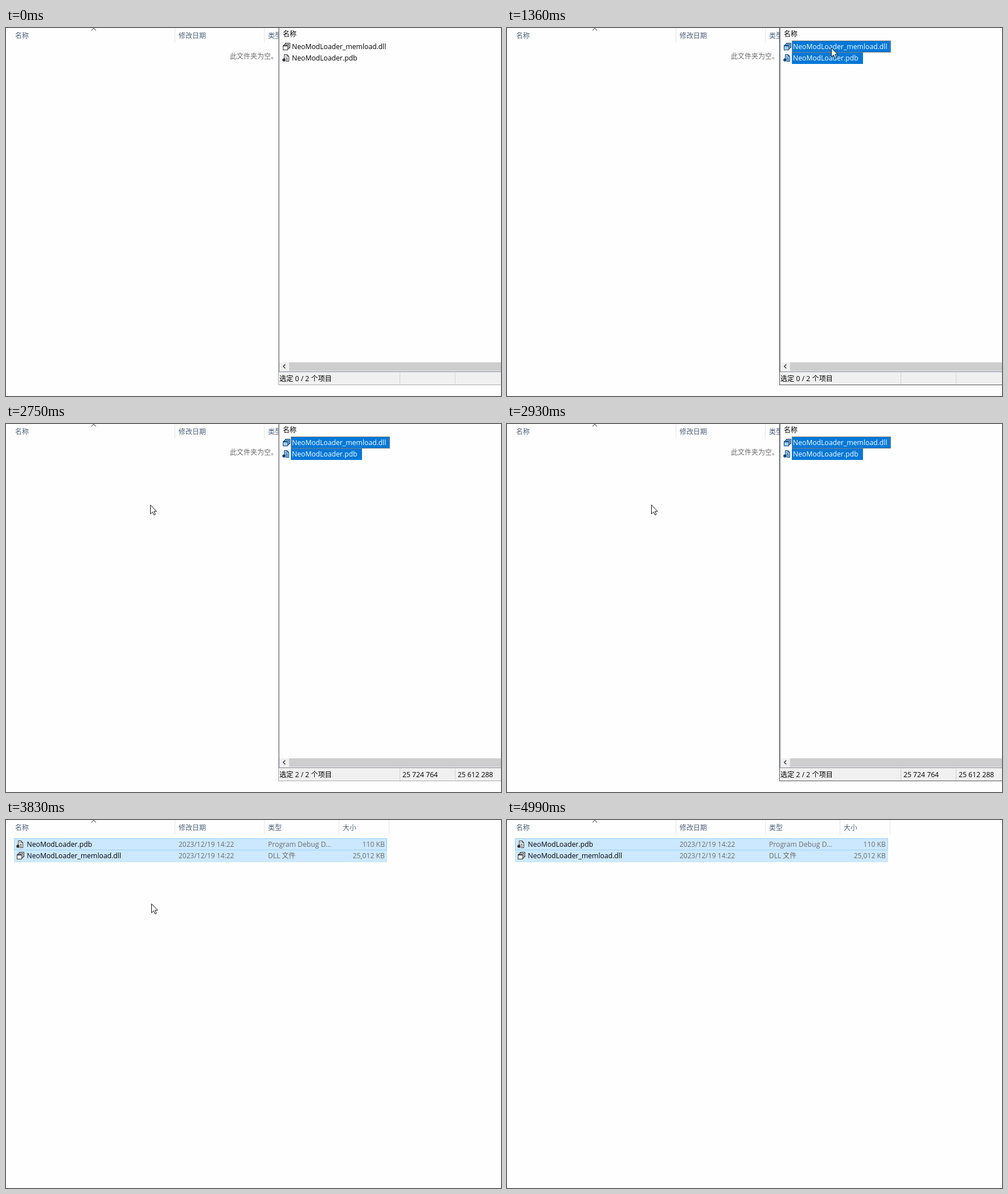
An HTML page for the animation above (5.38 s loop, 869 px wide and 645 px high).

```html
<!DOCTYPE html>
<html lang="zh-CN">
<head>
<meta charset="utf-8">
<title>文件拖放</title>
<style>
  html, body { margin: 0; width: 100%; height: 100%; overflow: hidden; background: #fefefe; }
  svg { display: block; width: 869px; height: 645px; }
  text { font: 12px "Open Sans", "Noto Sans CJK SC", "Noto Sans CJK", "Noto Sans", sans-serif; white-space: pre; }
  .name { font-size: 12.2px; }
  .num { font-size: 12.2px; }
  .head { fill: #4c607a; }
  .info { fill: #6d6d6d; }
  .crisp { shape-rendering: crispEdges; }
  .icon { color: #333; --paper: #fff; }
  .picked .icon { color: #0b4474; --paper: #9fcdf2; }
  .bar { display: none; }
  .picked .bar { display: inline; }
  .picked text { fill: #fff; }
</style>
</head>
<body>
<svg viewBox="0 0 869 645">
  <defs>
    <g id="dll" class="crisp" fill="none" stroke="currentColor">
      <path d="M4.5 2V.5H12.5V8.5H11" fill="var(--paper)"/>
      <path d="M2.5 4V2.5H10.5V10.5H9" fill="var(--paper)"/>
      <rect x=".5" y="4.5" width="8" height="8" fill="var(--paper)"/>
      <path d="M0 5H9" stroke-width="2"/>
    </g>
    <g id="pdb" fill="none" stroke="currentColor">
      <path d="M3.5 8V.5H8.5L11.5 3.5V12.5H6" fill="var(--paper)"/>
      <path d="M8.5 .5V3.5H11.5M5.5 3.5H7M5.5 6.5H9.5M7 8.5H9.5M7 10.5H9.5"/>
      <circle cx="3" cy="10" r="2.8" fill="currentColor" stroke="none"/>
    </g>
  </defs>

  <g id="folder">
    <path class="crisp" stroke="#e5e5e5" d="M296.5 0V26M453.5 0V26M584.5 0V26M672.5 0V26"/>
    <path d="M150 4.3L154 .3L158 4.3" fill="none" stroke="#6b6b6b" stroke-width="1.1"/>
    <g class="head">
      <text x="16" y="18">名称</text>
      <text x="303" y="18">修改日期</text>
      <text x="460" y="18">类型</text>
      <text x="591" y="18">大小</text>
    </g>
    <text id="empty" class="info" x="393" y="54">此文件夹为空。</text>
    <g id="files">
      <g class="crisp">
        <rect x="14" y="32" width="655" height="42" fill="#cce8ff"/>
        <rect x="14.5" y="32.5" width="654" height="20" fill="none" stroke="#99d1ff"/>
      </g>
      <g class="icon">
        <use href="#pdb" x="18" y="36"/>
        <use href="#dll" x="19" y="56"/>
      </g>
      <text class="name" x="36.5" y="47">NeoModLoader.pdb</text>
      <text class="name" x="36.5" y="67">NeoModLoader_memload.dll</text>
      <g class="info">
        <text x="303" y="47">2023/12/19 14:22</text>
        <text x="303" y="67">2023/12/19 14:22</text>
        <text class="num" x="460" y="47">Program Debug D...</text>
        <text x="460" y="67">DLL 文件</text>
        <text class="num" x="665" y="47" text-anchor="end">110 KB</text>
        <text class="num" x="665" y="67" text-anchor="end">25,012 KB</text>
      </g>
    </g>
  </g>

  <g id="archive">
    <g class="crisp">
      <rect x="478" y="0" width="391" height="626" fill="#fefefe"/>
      <rect x="480" y="586" width="389" height="16" fill="#f0f0f0"/>
      <rect x="497" y="586" width="372" height="15" fill="#cdcdcd"/>
      <rect x="479" y="603" width="390" height="22" fill="#f0f0f0"/>
      <path d="M691.5 604V624M788.5 604V624" stroke="#d2d2d2"/>
      <path d="M479.5 0V602.5H869" fill="none" stroke="#828790"/>
      <path id="edge" d="M478.5 0V625.5H869" fill="none" stroke="#aaa"/>
    </g>
    <path d="M490.3 589.5L486.8 593L490.3 596.5" fill="none" stroke="#404040" stroke-width="1.6"/>
    <text x="486" y="15">名称</text>
    <g id="rowDll">
      <g class="bar crisp">
        <rect x="500" y="22" width="174" height="21" fill="#0078d7"/>
        <rect x="500.5" y="22.5" width="173" height="20" fill="none" stroke="#ff8728" stroke-dasharray="1 1"/>
      </g>
      <g class="icon"><use href="#dll" x="486" y="26"/></g>
      <text class="name" x="502" y="37">NeoModLoader_memload.dll</text>
    </g>
    <g id="rowPdb">
      <rect class="bar crisp" x="500" y="43" width="125" height="20" fill="#0078d7"/>
      <g class="icon"><use href="#pdb" x="485" y="46"/></g>
      <text class="name" x="502" y="57">NeoModLoader.pdb</text>
    </g>
    <rect id="band" class="crisp" fill="#0078d7" fill-opacity=".3" stroke="#0078d7"/>
    <text id="status" class="num" x="480" y="619"></text>
    <g id="sizes">
      <text class="num" x="696" y="619">25 724 764</text>
      <text class="num" x="793" y="619">25 612 288</text>
    </g>
  </g>

  <g id="cursor">
    <path d="M.5 .8V16.6L4.3 13.2L6.9 18.6L9.2 17.5L6.7 12.2H11.4Z" fill="#fff" stroke="#111"/>
    <g id="copy" class="crisp" fill="none" stroke="#111">
      <rect x="3.5" y="16.5" width="10" height="7" stroke-dasharray="1 1"/>
      <rect x="10.5" y="19.5" width="10" height="10" fill="#fff"/>
      <path d="M13 24.5H18M15.5 22V27"/>
    </g>
  </g>
</svg>
<script>
const LOOP = 5380;
const BAND = { x: 643, y: 116, from: 1020, to: 1360 };
const CLOSE = { from: 3030, to: 3160 };

// Pointer path: time, x, y
const path = [
  [230, 533, 599], [380, 585, 480], [520, 645, 300], [640, 672, 175], [750, 660, 123],
  [870, 643, 116], [970, 623, 96], [1020, 623, 96], [1300, 569, 34],
  [1960, 569, 34], [2200, 427, 77], [2250, 427, 77], [2520, 253, 141],
  [3160, 253, 141], [3410, 255, 146],
  [4310, 255, 146], [4460, 310, 240], [4620, 420, 440], [4760, 507, 590],
  [4860, 504, 623], [4950, 468, 641]
];

const $ = id => document.getElementById(id);
const show = (id, on) => { $(id).style.display = on ? "" : "none"; };
const within = (t, a, b) => t >= a && t < b;

function pointerAt(t) {
  const i = path.findIndex(p => p[0] > t);
  if (i === 0) return path[0].slice(1);
  if (i < 0) return path[path.length - 1].slice(1);
  const [t0, x0, y0] = path[i - 1], [t1, x1, y1] = path[i];
  const k = (t - t0) / (t1 - t0);
  return [Math.round(x0 + (x1 - x0) * k), Math.round(y0 + (y1 - y0) * k)];
}

function render(t) {
  const [x, y] = pointerAt(t);
  show("cursor", within(t, 230, 4990));
  $("cursor").setAttribute("transform", `translate(${x} ${y})`);
  show("copy", within(t, 2000, 2670) && x < 478);

  const banding = within(t, BAND.from, BAND.to);
  show("band", banding);
  if (banding) {
    const box = { x: x + .5, y: y + .5, width: BAND.x - x, height: BAND.y - y };
    for (const key in box) $("band").setAttribute(key, box[key]);
  }
  const picking = t >= BAND.from;
  $("rowPdb").classList.toggle("picked", picking && (y < 63 || t >= BAND.to));
  $("rowDll").classList.toggle("picked", picking && (y < 43 || t >= BAND.to));

  const counted = t >= 1520;
  $("status").textContent = `选定 ${counted ? 2 : 0} / 2 个项目`;
  show("sizes", counted);

  const active = t >= 870 && !within(t, 2670, 2790);
  $("edge").setAttribute("stroke", active ? "#555" : "#aaa");
  const fade = (t - CLOSE.from) / (CLOSE.to - CLOSE.from);
  $("archive").style.opacity = 1 - Math.min(1, Math.max(0, fade));
  show("archive", t < CLOSE.to);

  show("empty", t < 3830);
  show("files", t >= 3830);
}

const start = performance.now();
function tick() {
  render((performance.now() - start) % LOOP);
  requestAnimationFrame(tick);
}
tick();
</script>
</body>
</html>
```
